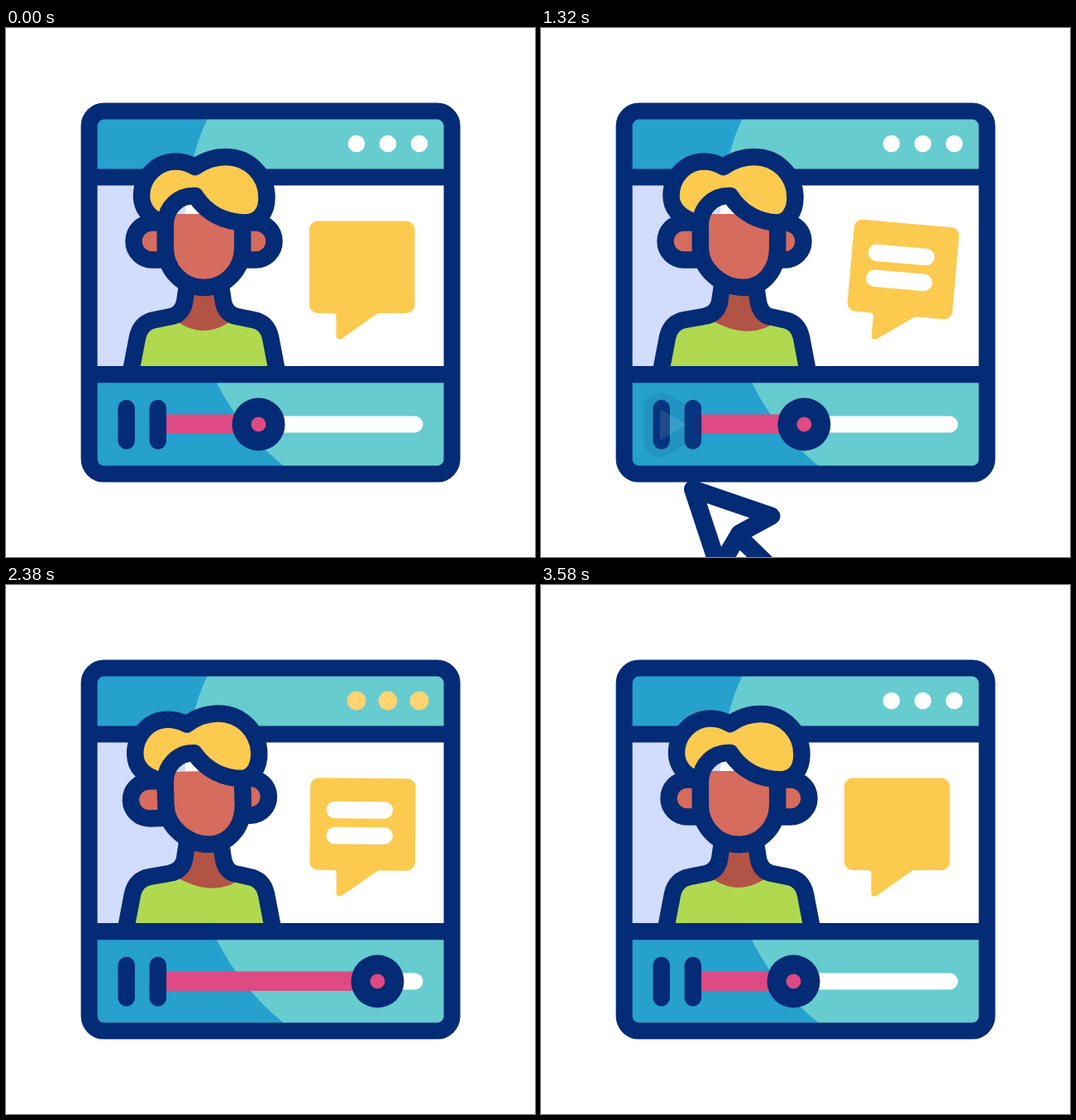
Write an HTML page with a canvas that moves like this. It is 640 px wide and 640 px high and loops after 3600 ms.

```html
<!DOCTYPE html>
<html lang="en">
<head>
<meta charset="utf-8">
<title>Video player</title>
<style>
html, body { margin: 0; width: 100%; height: 100%; overflow: hidden; background: #fff; }
canvas { display: block; }
</style>
</head>
<body>
<canvas id="stage" width="640" height="640"></canvas>
<script>
const ctx = document.getElementById('stage').getContext('2d');
const LOOP = 3600;
const NAVY = '#032b76', BLUE = '#26a0cd', TEAL = '#66ccd0', LAVENDER = '#d2dcfd';
const YELLOW = '#fdca50', SKIN = '#d66c5d', NECK = '#b15345', LIME = '#b0d950', PINK = '#de4a83';

const smooth = u => u * u * (3 - 2 * u);

// Eased value at time t from [time, value] pairs
function tween(t, ...keys) {
  if (t <= keys[0][0]) return keys[0][1];
  for (let i = 1; i < keys.length; i++) {
    const [t0, v0] = keys[i - 1], [t1, v1] = keys[i];
    if (t < t1) return v0 + (v1 - v0) * smooth((t - t0) / (t1 - t0));
  }
  return keys[keys.length - 1][1];
}

function shape(d, fill, stroke, width = 20.5) {
  const path = new Path2D(d);
  if (fill) { ctx.fillStyle = fill; ctx.fill(path); }
  if (stroke) { ctx.strokeStyle = stroke; ctx.lineWidth = width; ctx.stroke(path); }
}

function rect(x, y, w, h, fill) {
  ctx.fillStyle = fill;
  ctx.fillRect(x, y, w, h);
}

function disc(x, y, r, fill) {
  ctx.fillStyle = fill;
  ctx.beginPath();
  ctx.arc(x, y, r, 0, 7);
  ctx.fill();
}

function group(draw, { x = 0, y = 0, angle = 0, scale = 1, alpha = 1 }) {
  ctx.save();
  ctx.translate(x, y);
  ctx.rotate(angle * Math.PI / 180);
  ctx.scale(scale, scale);
  ctx.translate(-x, -y);
  ctx.globalAlpha = alpha;
  draw();
  ctx.restore();
}

function drawBackdrop() {
  const shade = 'M100 100H247L243 111C205 190 205 340 255 429C275 470 305 505 335 529L343 535H100Z';
  const bands = [[105, 75, BLUE, TEAL], [180, 240, LAVENDER, '#fff'], [420, 115, BLUE, TEAL]];
  for (const [y, h, dark, light] of bands) {
    ctx.save();
    ctx.beginPath();
    ctx.rect(105, y, 430, h);
    ctx.clip();
    rect(105, y, 430, h, light);
    shape(shade, dark);
    ctx.restore();
  }
  rect(100, 170.5, 440, 20, NAVY);
}

function drawFrame() {
  rect(100, 409, 440, 20.3, NAVY);
  ctx.strokeStyle = NAVY;
  ctx.lineWidth = 20;
  ctx.beginPath();
  ctx.roundRect(100.6, 100.6, 439, 439, 18);
  ctx.stroke();
}

function drawDots(t) {
  const pulse = t < 1400 ? 0 : tween((t - 1400) % 800, [80, 0], [220, 1], [310, 1], [450, 0]);
  const mix = (a, b) => Math.round(a + (b - a) * pulse);
  const color = `rgb(${mix(255, 253)},${mix(255, 202)},${mix(255, 80)})`;
  for (const x of [424, 462, 500]) disc(x, 140, 10.3 + 1.4 * pulse, color);
}

function drawBody(turn) {
  const l = -6 * turn, r = -5 * turn, n = -3 * turn;
  shape(`M${151 + l} 416L${159 + l} 374Q${163 + l} 356 ${180 + l} 353L${200 + n} 349Q213 346 216 332L219 312
    H260L263 332Q266 346 ${279 + n} 349L${299 + r} 353Q${316 + r} 356 ${320 + r} 374L${328 + r} 416`, LIME);
  shape(`M200 350Q${239 + 13 * turn} 382 ${278 + 10 * turn} ${350 + 3 * turn}L268 343L258 312H220L210 343Z`, NECK);
  shape(`M${151 + l} 416L${159 + l} 374Q${163 + l} 356 ${180 + l} 353L${200 + n} 349Q213 346 216 332L219 312
    M260 312L263 332Q266 346 ${279 + n} 349L${299 + r} 353Q${316 + r} 356 ${320 + r} 374L${328 + r} 416`, null, NAVY);
}

function drawHead(turn) {
  const h = x => x - 8 * turn, left = x => x - 6.5 * turn;
  shape(`M195 235.5H${177 - 4 * turn}a22.5 22.5 0 0 0 0 45H195`, SKIN, NAVY);
  shape(`M284 235.5H${302 - 7 * turn}a22.5 22.5 0 0 1 0 45H284`, SKIN, NAVY);
  shape(`M192.8 225V266C192.8 292 ${213 + 6 * turn} 314 ${239.5 + 5 * turn} 314
    C${266 + 4 * turn} 314 286.2 292 286.2 266V225`, SKIN, NAVY);
  shape(`M187 235C${left(171)} 228 ${left(164)} 216 ${left(164)} 203C${left(164)} 180 ${h(183)} 161.5 ${h(205)} 161.5
    C${h(215)} 161.5 ${h(222)} 164 ${h(229)} 168C${h(240)} 160 ${h(252)} 156 ${h(266)} 156
    C${h(294)} 156 ${h(315.5)} 178 ${h(315.5)} 205C${h(315.5)} 222 ${h(307)} 235 ${290 - 4 * turn} 235.5
    C265 235 243 225 229 203C208 202 194 218 193 235Z`, YELLOW, NAVY);
}

function drawPerson(t) {
  const turn = tween(t, [1000, 0], [1300, 1], [3000, 1], [3560, 0]);
  const tilt = tween(t, [1333, 0], [1667, -2], [2000, 2], [2333, -2], [2667, 2], [3000, 0]);
  drawBody(turn);
  group(() => drawHead(turn), { x: 238, y: 245, angle: tilt });
}

function drawBubble(t) {
  const angle = tween(t, [1000, 0], [1330, 5], [1755, -5], [2185, 5], [2605, -5], [3000, 5], [3400, 0]);
  const length = tween(t, [1000, 0], [1300, 60], [3000, 60], [3400, 0]);
  group(() => {
    shape(`M377 233.5H484.5a10 10 0 0 1 10 10V335a10 10 0 0 1 -10 10H450L406 376Q400 378.5 399.5 372.5V349
      Q399.5 345 396 345H377a10 10 0 0 1 -10 -10V243.5a10 10 0 0 1 10 -10Z`, YELLOW);
    if (length > 0) shape(`M397 272h${length}M397 303h${length}`, null, '#fff');
  }, { x: 403, y: 377, angle });
}

function drawControls(t) {
  const knob = tween(t, [1000, 305.5], [3000, 492], [3560, 305.5]);
  const play = tween(t, [0, 0], [400, 1], [1000, 1], [1400, 0]);
  shape(`M${knob} 479.5H494.5`, null, '#fff', 20);
  rect(186, 467.5, knob - 186, 23.5, PINK);
  disc(knob, 479.5, 32, NAVY);
  disc(knob, 479.5, 9, PINK);
  group(() => shape('M145.7 460V499.5M183.8 460V499.5', null, NAVY), { alpha: 1 - play });
  group(() => {
    const triangle = 'M144 461L176 480L144 499Z';
    shape(triangle, null, NAVY, 40);
    shape(triangle, '#fff');
  }, { alpha: play });
}

function drawCursor(t) {
  const away = tween(t, [330, 1], [735, 0], [1000, 0], [1722, 1]);
  if (away === 1) return;
  const scale = tween(t, [735, 1], [865, 0.92], [1000, 1]);
  ctx.save();
  ctx.translate(70 * away, 176 * away);
  group(() => {
    shape('M207 539L244 575', null, NAVY, 21.5);
    shape('M154.5 484.5L249.5 517L211 538L186 580Z', '#fff', NAVY, 21.5);
  }, { x: 163, y: 493, scale });
  ctx.restore();
}

function render(now) {
  const t = now % LOOP;
  ctx.lineCap = ctx.lineJoin = 'round';
  rect(0, 0, 640, 640, '#fff');
  drawBackdrop();
  drawDots(t);
  drawPerson(t);
  drawBubble(t);
  drawFrame();
  drawControls(t);
  drawCursor(t);
  requestAnimationFrame(() => render(performance.now() - start));
}

const start = performance.now();
render(0);
</script>
</body>
</html>
```
